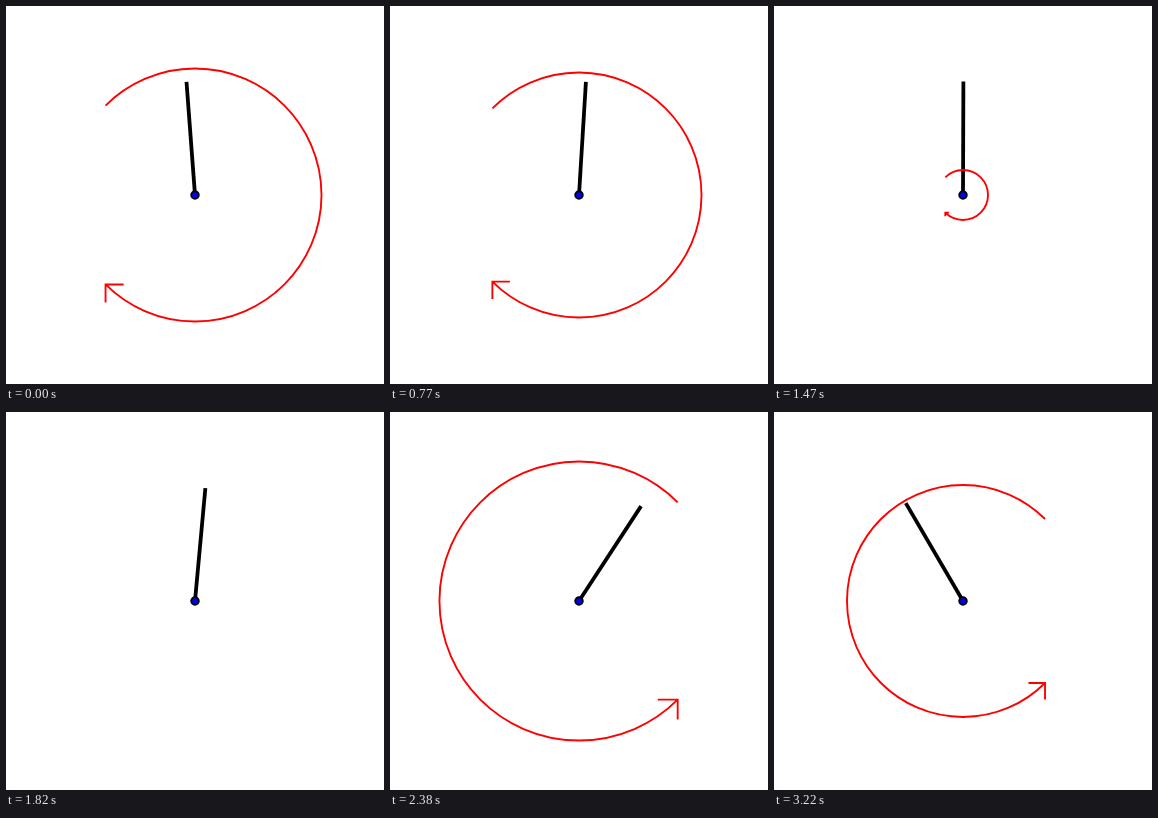
An HTML page for the animation above (3290 ms loop, 378 by 378 pixels).

```html
<!DOCTYPE html>
<html lang="en">
<head>
<meta charset="utf-8">
<title>Pendulum with torque</title>
<style>
  html, body { margin: 0; width: 100%; height: 100%; overflow: hidden; background: #fff; }
  svg { display: block; width: 100vw; height: 100vh; }
</style>
</head>
<body>
<svg viewBox="0 0 378 378">
  <g transform="translate(189 189)" fill="none">
    <line id="rod" y2="-113.4" stroke="#000" stroke-width="3.78"/>
    <path id="torque" stroke="#f00" stroke-width="1.89"/>
    <circle r="3.78" fill="#00f" stroke="#000" stroke-width="1.89"/>
  </g>
</svg>
<script>
  const STEP = 70, COUNT = 47;
  const rod = document.getElementById('rod');
  const torque = document.getElementById('torque');

  // [step, degrees from upright]
  const angles = [[0, -4.3], [4, 0.2], [7, 3.4], [11, 3.5], [16, 1.6], [21, 0.2],
    [25, 3.5], [30, 17.2], [35, 34.5], [39, 30.5], [46, -30.3]];

  // [step, arc radius], positive is clockwise
  const torques = [[0, 126.5], [2, 127.5], [4, 128], [5, 40], [7, -152.5], [8, -131],
    [11, 122.5], [12, 155.5], [14, 20], [16, -131], [17, -150], [19, -85], [21, 25],
    [23, 188], [24, 144], [26, 0], [28, -80], [30, -119], [32, -133], [36, -143],
    [39, -144], [40, -139.5], [46, -116]];

  const slope = (a, b) => (b[1] - a[1]) / (b[0] - a[0]);

  // Tangent that never overshoots the neighbouring points
  function tangent(points, i) {
    const last = points.length - 1;
    if (i === 0) return slope(points[0], points[1]);
    if (i === last) return slope(points[last - 1], points[last]);
    const before = slope(points[i - 1], points[i]);
    const after = slope(points[i], points[i + 1]);
    return before * after <= 0 ? 0 : 2 * before * after / (before + after);
  }

  function sample(points, x) {
    let i = 0;
    while (i < points.length - 2 && x >= points[i + 1][0]) i++;
    const [x0, y0] = points[i], [x1, y1] = points[i + 1];
    const w = x1 - x0, t = (x - x0) / w, u = 1 - t;
    return y0 * (1 + 2 * t) * u * u + y1 * t * t * (3 - 2 * t)
      + w * t * u * (u * tangent(points, i) - t * tangent(points, i + 1));
  }

  function arrow(value) {
    const r = Math.abs(value), side = value < 0 ? 1 : -1;
    const d = r * Math.SQRT1_2, x = side * d, head = r / 7;
    const sweep = value < 0 ? 0 : 1;
    return `M${x} ${-d}A${r} ${r} 0 1 ${sweep} ${x} ${d}` +
      `M${x - side * head} ${d}H${x}V${d + head}`;
  }

  function draw(now) {
    const step = Math.floor(now / STEP) % COUNT;
    rod.setAttribute('transform', `rotate(${sample(angles, step)})`);
    torque.setAttribute('d', arrow(sample(torques, step)));
  }

  let start;
  function tick(now) {
    start ??= now;
    draw(now - start);
    requestAnimationFrame(tick);
  }
  draw(0);
  requestAnimationFrame(tick);
</script>
</body>
</html>
```
